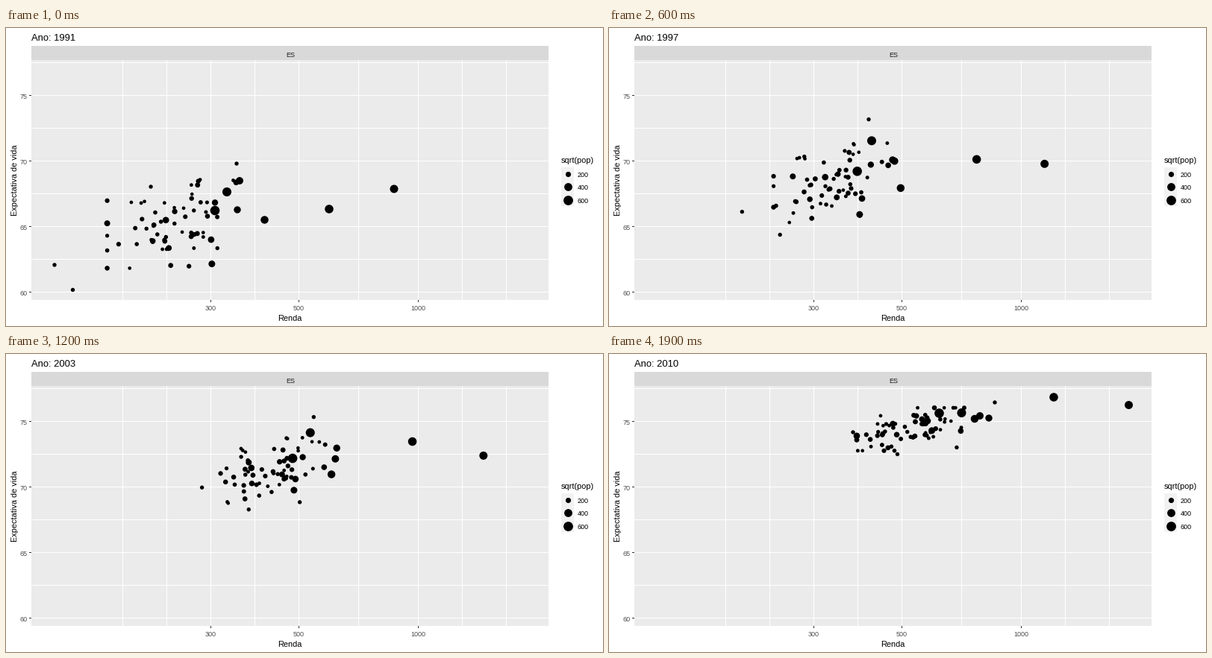
A matplotlib script that plays this animation: 800 by 400 pixels, repeating every 2 s.

```python
import numpy as np
import matplotlib.pyplot as plt
from matplotlib.animation import FuncAnimation
from matplotlib.patches import Rectangle

W, H, DPI = 800, 400, 80
PT = 72 / DPI  # points per pixel
YEARS = (1991, 2000, 2010)  # survey years, motion is linear in between

plt.rcParams["font.family"] = "Liberation Sans"
fig = plt.figure(figsize=(W / DPI, H / DPI), dpi=DPI, facecolor="white")
ax = fig.add_axes([0, 0, 1, 1])
ax.set_xlim(0, W)
ax.set_ylim(H, 0)
ax.axis("off")


def box(x, y, w, h, color):
    ax.add_patch(Rectangle((x, y), w, h, fc=color, lw=0,
                           antialiased=False, zorder=1))


def label(x, y, s, size, color="black", **kw):
    kw.setdefault("va", "baseline")
    return ax.text(x, y, s, fontsize=size * PT, color=color, **kw)


def dots(x, y, r):
    return ax.scatter(x, y, s=(2 * r * PT) ** 2, c="black",
                      linewidths=0, zorder=3)


def log_x(income):
    return 552 + 531.5 * np.log10(income / 1000)


def draw_chart():
    box(34, 24, 693, 19, "#D9D9D9")
    box(34, 43, 693, 322, "#EBEBEB")
    label(381, 39, "ES", 9, "#1A1A1A", ha="center")

    ticks = [int(log_x(v) + 0.5) for v in (300, 500, 1000)]
    a, b, c = ticks
    near, far = (b - a) / 2, (c - b) / 2
    minor = [a - 2 * near, a - near, a + near, b + far, c + near, c + 2 * near]
    for x in ticks + minor:
        box(int(x), 43, 1, 322, "white")
    for y in range(46, 365, 44):
        box(34, y, 693, 1, "white")

    for x, v in zip(ticks, (300, 500, 1000)):
        box(x, 365, 1, 3, "#333333")
        label(x, 379, str(v), 9, "#4D4D4D", ha="center")
    for k in range(4):
        y = 90 + 88 * k
        box(31, y, 3, 1, "#333333")
        label(29, y + 5, str(75 - 5 * k), 9, "#4D4D4D", ha="right")
    label(380.5, 393, "Renda", 11, ha="center")
    label(17, 204, "Expectativa de vida", 11, rotation=90,
          ha="right", va="center")


def draw_legend():
    label(744, 181, "sqrt(pop)", 11)
    box(744, 187, 17, 52, "#F2F2F2")
    for k, r in enumerate((3.6, 5.4, 6.4)):
        y = 196 + 17.3 * k
        dots(752.5, y, r)
        label(766, y + 4, str(200 * (k + 1)), 9)


# Largest cities, biggest first: x, y at each survey year
CITIES = [
    (280, 245, 359, 166, 442.5, 79.5),
    (296, 220, 380, 117, 472.5, 79),
    (433, 243, 522.5, 143, 596, 58),
    (520, 216, 615.5, 165.5, 696.5, 68.5),
    (346.5, 257.5, 413, 193.5, 490, 87),
    (313, 205, 417.5, 165.5, 497, 83),
    (310, 244, 415, 143.5, 509, 86),
]
# Towns at the edges of the cloud
EDGES = [
    (65, 318, 235, 211, 327, 105),
    (89.5, 351.5, 299, 240.5, 386.5, 134.5),
    (309, 182, 367.5, 93, 517, 65),
]


def cloud(n, rng, memory=0.78, tilt=-0.4):
    """Scattered towns whose rank drifts slowly from survey to survey."""
    z = rng.normal(size=(n, 2))
    stages = []
    for centre, spread in (((222, 263), (48, 33)),
                           ((335, 180), (40, 28)),
                           ((404, 101), (40, 16))):
        z = (z - z.mean(0)) / z.std(0)
        tilted = np.column_stack([z[:, 0], tilt * z[:, 0] + 0.92 * z[:, 1]])
        stages.append(centre + spread * np.clip(tilted, -1.8, 1.8))
        z = memory * z + np.sqrt(1 - memory ** 2) * rng.normal(size=(n, 2))
    return np.stack(stages, axis=1)


rng = np.random.default_rng(12)
named = np.array(CITIES + EDGES).reshape(-1, 3, 2)
towns = cloud(64, rng)
path = np.concatenate([named, towns])
radius = np.concatenate([
    np.linspace(6.3, 4.7, len(CITIES)),
    np.full(len(EDGES), 2.7),
    np.clip(2.3 + rng.exponential(0.7, len(towns)), 2.3, 4.5)])

draw_chart()
draw_legend()
title = label(34, 17, "", 13)
points = dots(*path[:, 0].T, radius)


def draw(i):
    year = YEARS[0] + i
    k = int(year > YEARS[1])
    t = (year - YEARS[k]) / (YEARS[k + 1] - YEARS[k])
    points.set_offsets(path[:, k] + t * (path[:, k + 1] - path[:, k]))
    title.set_text(f"Ano: {year}")
    return points, title


anim = FuncAnimation(fig, draw, frames=YEARS[-1] - YEARS[0] + 1, interval=100,
                     init_func=lambda: draw(0), repeat=True, repeat_delay=0)
plt.show()
```
